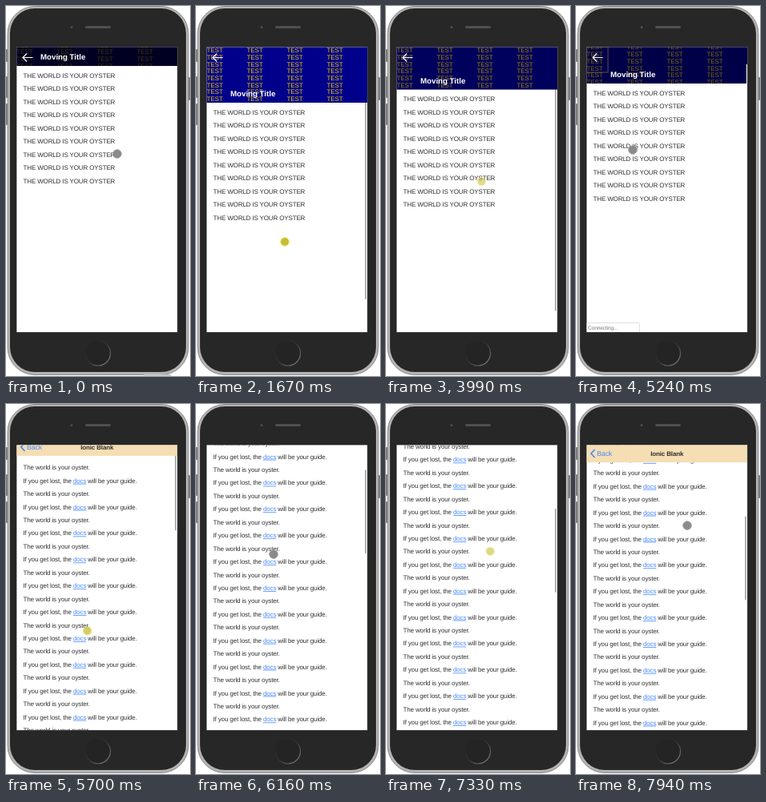
An HTML page for the animation above (8000 ms loop, 230 px wide and 463 px high).

```html
<!DOCTYPE html>
<html lang="en">
<head>
<meta charset="utf-8">
<title>Moving title</title>
<style>
  html, body { margin: 0; width: 100%; height: 100%; overflow: hidden; background: #fff; }
  svg { display: block; width: 230px; height: 463px; }
  text {
    font-family: "Liberation Sans", Arial, sans-serif;
    font-size: 8px; letter-spacing: -.14px; fill: #303030;
    text-rendering: geometricPrecision; white-space: pre;
  }
  .tile { fill: #f0d000; }
  .link { fill: #488aff; text-decoration: underline; }
</style>
</head>
<body>
<svg viewBox="0 0 230 463">
  <defs>
    <linearGradient id="ring" x2="1" y2="1">
      <stop offset="0" stop-color="#1c1c1c"/>
      <stop offset=".5" stop-color="#343434"/>
      <stop offset="1" stop-color="#8a8a8a"/>
    </linearGradient>
    <clipPath id="screen"><rect x="13.5" y="51.5" width="200.5" height="356.5"/></clipPath>
    <clipPath id="banner"><rect id="bannerClip" x="13" y="51" width="201" height="70"/></clipPath>
  </defs>

  <g fill="#777">
    <rect x="0" y="54" width="3" height="16" rx="1"/>
    <rect x="0" y="88" width="3" height="27" rx="1"/>
    <rect x="0" y="122" width="3" height="27" rx="1"/>
    <rect x="227" y="89" width="3" height="29" rx="1"/>
  </g>
  <rect x="2" y=".5" width="226" height="461" rx="34" fill="#b4b4b4" stroke="#8a8a8a"/>
  <rect x="5" y="3" width="220" height="455" rx="31" fill="#272727"/>
  <circle cx="82" cy="26.5" r="1.5" fill="#4d4d4d"/>
  <rect x="99" y="25" width="32" height="3" rx="1.5" fill="#505050"/>
  <circle cx="115" cy="434.5" r="15.5" fill="#242424" stroke="url(#ring)" stroke-width="1.2"/>
  <rect id="edge" x="172" y="461" width="34" height="2" fill="#c9c9c9"/>

  <rect x="13.5" y="51.5" width="200.5" height="356.5" stroke="#606060"/>
  <g clip-path="url(#screen)">
    <rect x="13" y="51" width="201" height="357" fill="#fff"/>
    <g id="pageA">
      <g id="listA"></g>
      <rect id="barA" x="211" width="2" height="316" rx="1" fill="#000" opacity=".3"/>
      <g clip-path="url(#banner)">
        <rect x="13" y="51" width="201" height="70" fill="#00008b"/>
        <g id="tiles"></g>
        <rect id="shade" x="13" y="51" width="201" height="70"/>
      </g>
      <path d="M33.5 64.5H21M26 59.5L21 64.5L26 69.5" fill="none" stroke="#fff" stroke-width="1.2"/>
      <text id="title" x="43" style="font-size:9.7px;letter-spacing:0;font-weight:bold;fill:#fff">Moving Title</text>
      <g id="leaving">
        <rect x="13.5" y="51.5" width="26.5" height="31.5" fill="none" stroke="#c8a858" stroke-opacity=".45"/>
        <rect x="213" y="73" width="1" height="24" fill="#fff"/>
        <rect x="12.5" y="396.5" width="67" height="13" rx="1.5" fill="#fff" stroke="#e0e0e0"/>
        <text x="15" y="404.5" style="font-size:6.6px;fill:#777">Connecting...</text>
      </g>
    </g>
    <g id="pageB">
      <g id="listB"></g>
      <rect id="barB" x="211" width="2" height="105" rx="1" fill="#000" opacity=".3"/>
      <g id="toolbar">
        <rect x="13" y="51" width="201" height="22" fill="#f5deb3"/>
        <path d="M23.5 57L18.8 62L23.5 67" fill="none" stroke="#488aff" stroke-width="1.7"/>
        <text x="26" y="65" style="font-size:8.8px;fill:#488aff">Back</text>
        <text x="113.7" y="64.8" text-anchor="middle" style="font-weight:bold">Ionic Blank</text>
      </g>
    </g>
  </g>
  <circle id="dot" r="5.3"/>
</svg>
<script>
const LOOP = 8000, SWAP = 5450, PITCH = 16.44, FOLD = 46, BAR = 22;
const $ = id => document.getElementById(id);
const set = (id, attrs) => { for (const k in attrs) $(id).setAttribute(k, attrs[k]); };
const show = (id, on) => { $(id).style.display = on ? '' : 'none'; };
const clamp = (v, lo, hi) => Math.min(hi, Math.max(lo, v));
const shift = y => ({ transform: `translate(0 ${y})` });

// Pointer stops: time, x, y, finger down on the way to the next stop.
const stops = [
  [0, 139, 185, 0], [450, 58, 92, 0], [900, 104, 185, 1], [1670, 111, 295, 1],
  [2130, 112, 195, 1], [2520, 112, 292, 1], [2820, 118, 152, 1], [3400, 121, 233, 0],
  [3760, 120, 236, 1], [4130, 119, 212, 0], [4530, 27, 65, 0], [5000, 27, 65, 0],
  [5240, 71, 180, 0], [5600, 102, 292, 1], [6160, 97, 188, 0], [6560, 112, 251, 1],
  [6640, 112, 243, 1], [6860, 114, 265, 1], [6940, 114, 265, 0], [7020, 118, 359, 1],
  [7480, 134, 130, 1], [7700, 139, 152, 0], [LOOP, 139, 152, 0]
];

// Dragging moves the page under the finger; both headers follow the scroll.
function pose(t) {
  const s = { fold: FOLD, scroll: 0, hide: 0 };
  for (let i = 0; stops[i][0] <= t; i++) {
    const [t0, x0, y0, down] = stops[i], [t1, x1, y1] = stops[i + 1];
    const p = Math.min(1, (t - t0) / (t1 - t0)), e = (1 - Math.cos(Math.PI * p)) / 2;
    const dy = (y1 - y0) * e;
    Object.assign(s, { x: x0 + (x1 - x0) * e, y: y0 + dy, down, blur: Math.sin(Math.PI * p) });
    if (down && t0 < SWAP) s.fold = clamp(s.fold - dy, 0, FOLD);
    if (down && t0 > SWAP) {
      s.scroll = Math.max(0, s.scroll - dy);
      s.hide = clamp(s.hide - dy, 0, BAR);
    }
  }
  return s;
}

const line = (x, y, body, cls = '') => `<text x="${x}" y="${y}" class="${cls}">${body}</text>`;
const fill = (id, n, fn) => { $(id).innerHTML = Array.from({ length: n }, (_, i) => fn(i)).join(''); };

fill('listA', 9, i => line(21.5, 136 + i * PITCH, 'THE WORLD IS YOUR OYSTER'));
fill('listB', 48, i => line(21.5, 90.4 + i * PITCH, i % 2
  ? 'If you get lost, the <tspan class="link">docs</tspan> will be your guide.'
  : 'The world is your oyster.'));
fill('tiles', 48, i => line(13.6 + i % 4 * 50, 58.2 + (i >> 2) * 8.71, 'TEST', 'tile'));

function draw(t) {
  const { x, y, down, blur, fold, scroll, hide } = pose(t);
  show('pageA', t < SWAP);
  show('pageB', t >= SWAP);
  show('edge', t < 70);

  set('listA', shift(-fold));
  set('bannerClip', { height: 70 - fold });
  set('tiles', shift(-fold * .52));
  set('shade', { 'fill-opacity': Math.min(.75, fold * .02) });
  set('title', { y: 113.2 - fold });
  set('barA', { y: 51 + fold * .89 });
  show('barA', down);
  show('leaving', t >= 5000);

  set('listB', shift(-scroll));
  set('barB', { y: 51 + scroll * .301 });
  set('toolbar', shift(-hide));

  set('dot', {
    cx: x, cy: y,
    fill: down ? '#c4bc3a' : '#858585',
    stroke: down ? '#f2ea5c' : '#9c9c9c',
    opacity: down ? 1 - blur / 2 : .95
  });
}

const start = performance.now();
function tick(now) {
  draw(Math.max(0, now - start) % LOOP);
  requestAnimationFrame(tick);
}
draw(0);
requestAnimationFrame(tick);
</script>
</body>
</html>
```
